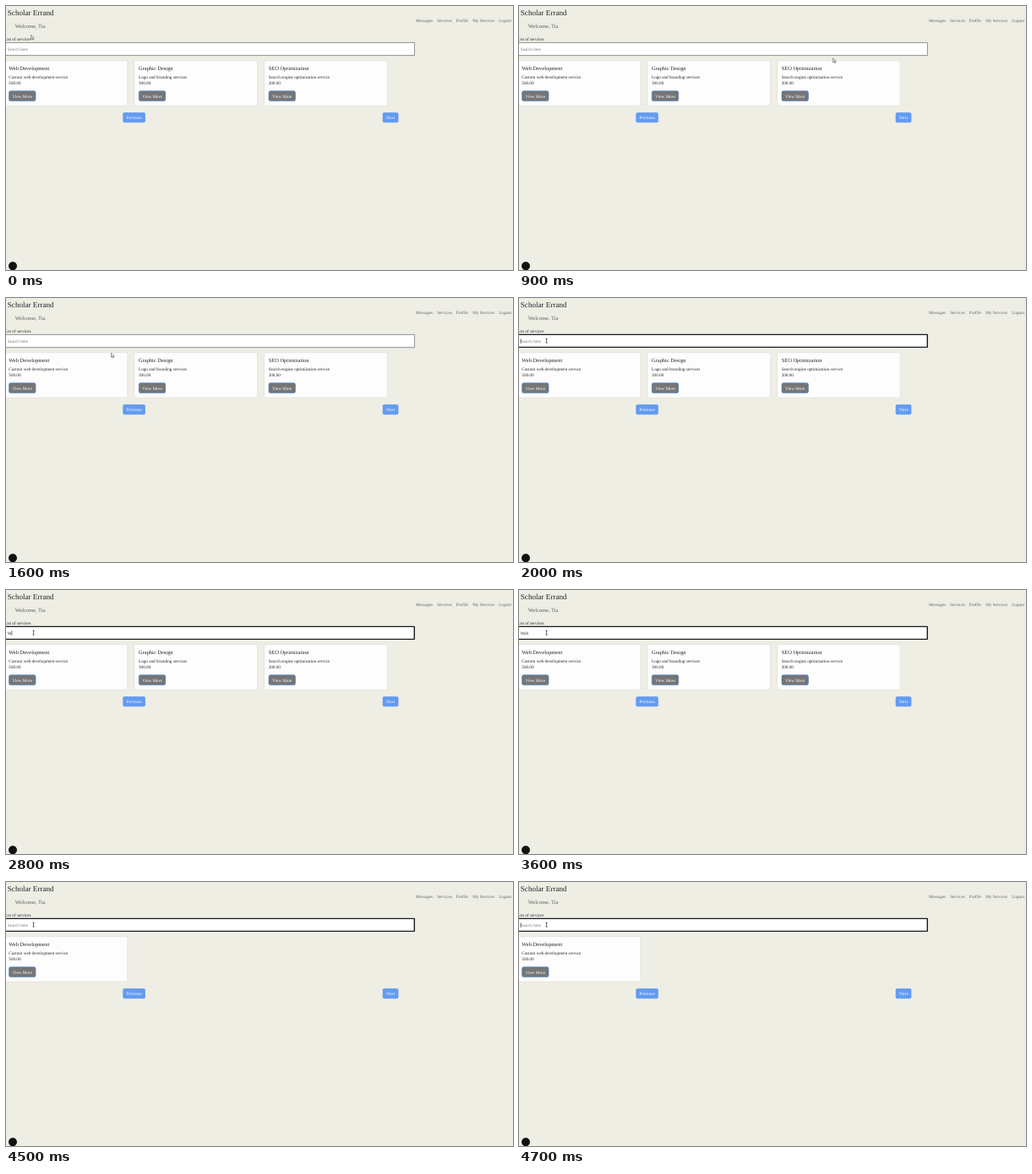
Animation of 600x313 px, one loop 5000 ms. Source, as an HTML page with a canvas:

```html
<!DOCTYPE html>
<html lang="en">
<head>
<meta charset="utf-8">
<title>Service list</title>
<style>
  html, body { margin: 0; width: 100%; height: 100%; overflow: hidden; background: #eeeee5; }
  canvas { display: block; width: 600px; height: 313px; }
</style>
</head>
<body>
<canvas id="stage"></canvas>
<script>
const W = 600, H = 313, LOOP = 5000, STEP = 100;
const BODY = 5.18, HEADING = 6.45;
const INK = '#212529';
const canvas = document.getElementById('stage');
const ctx = canvas.getContext('2d');
const ratio = window.devicePixelRatio || 1;
canvas.width = W * ratio;
canvas.height = H * ratio;

const nav = [['Messages', 485], ['Services', 510.2], ['Profile', 532.8], ['My Services', 552.2], ['Logout', 583.2]];
const cards = [
  ['Web Development', 'Custom web development service', '500.00'],
  ['Graphic Design', 'Logo and branding services', '300.00'],
  ['SEO Optimization', 'Search engine optimization service', '200.00']
];
// Pointer keys: time, x, y
const path = [
  [0, 29.7, 34.5], [100, 42, 52], [200, 92, 112], [300, 190, 165], [400, 300, 180],
  [500, 400, 172], [600, 440, 150], [700, 440, 120], [800, 412, 85], [900, 371.7, 62],
  [1100, 290, 63], [1600, 124.6, 65.3], [1700, 80, 59.5], [1800, 32.6, 50.6]
];
// Search field: time, typed text, caret shown
const typing = [
  [2000, '', true], [2500, '', false], [2800, 'W', true], [3000, 'We', true],
  [3100, 'Web', true], [3600, 'Web', false], [4000, 'Web', true], [4300, 'Web', false],
  [4500, '', false], [4700, '', true]
];

function text(str, x, y, size = BODY, color = INK, align = 'left') {
  ctx.font = `${size}px "Liberation Serif", "Times New Roman", serif`;
  ctx.textAlign = align;
  ctx.fillStyle = color;
  ctx.fillText(str, x, y);
}

function box(x, y, w, h, radius, fill, stroke, line = 0.5) {
  ctx.beginPath();
  ctx.roundRect(x, y, w, h, radius);
  ctx.fillStyle = fill;
  ctx.fill();
  if (!stroke) return;
  ctx.strokeStyle = stroke;
  ctx.lineWidth = line;
  ctx.stroke();
}

function drawHeader() {
  text('Scholar Errand', 1.8, 11.4, 9.1);
  text('Welcome, Tia', 10.8, 26.2, HEADING, '#5c5d5c');
  for (const [label, x] of nav) text(label, x, 18.9, BODY, '#656665');
  text('List of services', -2, 41.3);
}

function drawSearch(t) {
  const focused = t >= typing[0][0];
  const [, typed, caret] = typing.filter(k => k[0] <= t).pop() || [0, '', false];
  if (focused) box(-3, 43.4, 486.3, 15, 0.4, '#fff', '#1b1b1f', 1.4);
  else box(-3, 43.4, 486.4, 15.2, 0, '#fff', '#767676', 0.8);
  text(typed || 'Search here', 1.8, 52.7, BODY, typed ? INK : '#777');
  if (caret) {
    const x = 1.8 + (typed ? ctx.measureText(typed).width : 0);
    ctx.fillStyle = '#111';
    ctx.fillRect(x - 0.1, 48.3, 0.6, 5.6);
  }
}

function drawCard([title, info, price], i) {
  const x = -1.9 + 153.7 * i, left = x + 5.2;
  box(x, 64.7, 145.7, 53.5, 1.8, '#fdfdfd', '#d5d5d0');
  text(title, left, 75.8, HEADING);
  text(info, left, 85.6);
  text(price, left, 93.3);
  box(left + 0.3, 100.8, 31.4, 11.8, 1.8, '#757575', '#4a82c8', 0.7);
  text('View More', left + 16, 108.5, BODY, '#fff', 'center');
}

function drawPager(label, x, w) {
  box(x, 126.2, w, 12, 1.9, '#639bf1');
  text(label, x + w / 2, 134, BODY, '#fff', 'center');
}

function pointerAt(t) {
  const i = path.findIndex(k => k[0] > t);
  if (i < 0) return path[path.length - 1].slice(1);
  const [t0, x0, y0] = path[i - 1], [t1, x1, y1] = path[i];
  const f = (t - t0) / (t1 - t0);
  return [x0 + (x1 - x0) * f, y0 + (y1 - y0) * f];
}

function drawPointer(t) {
  const [x, y] = pointerAt(t);
  const overField = y > 43 && y < 59 && x < 484;
  ctx.beginPath();
  if (overField) {
    for (const s of [-1, 1]) {
      ctx.moveTo(x - 1, y + 2.5 * s);
      ctx.lineTo(x + 1, y + 2.5 * s);
    }
    ctx.moveTo(x, y - 2.5);
    ctx.lineTo(x, y + 2.5);
    ctx.lineWidth = 0.65;
    ctx.strokeStyle = '#111';
  } else {
    const shape = [[0, 0], [0, 5], [1.2, 3.9], [2, 5.7], [2.8, 5.3], [2, 3.6], [3.6, 3.6]];
    for (const [dx, dy] of shape) ctx.lineTo(x + dx, y + dy);
    ctx.closePath();
    ctx.fillStyle = '#fff';
    ctx.fill();
    ctx.lineWidth = 0.5;
    ctx.strokeStyle = '#222';
  }
  ctx.stroke();
}

function draw(t) {
  ctx.setTransform(ratio, 0, 0, ratio, 0, 0);
  ctx.textRendering = 'geometricPrecision';
  ctx.fillStyle = '#eeeee5';
  ctx.fillRect(0, 0, W, H);
  drawHeader();
  drawSearch(t);
  cards.slice(0, t < 4500 ? 3 : 1).forEach(drawCard);
  drawPager('Previous', 138.3, 26.6);
  drawPager('Next', 445.7, 18.7);
  box(3, 303.3, 10, 10, 5, '#111');
  drawPointer(t);
}

const start = performance.now();
function tick() {
  const t = (performance.now() - start) % LOOP;
  draw(Math.floor(t / STEP) * STEP);
  requestAnimationFrame(tick);
}
tick();
</script>
</body>
</html>
```
